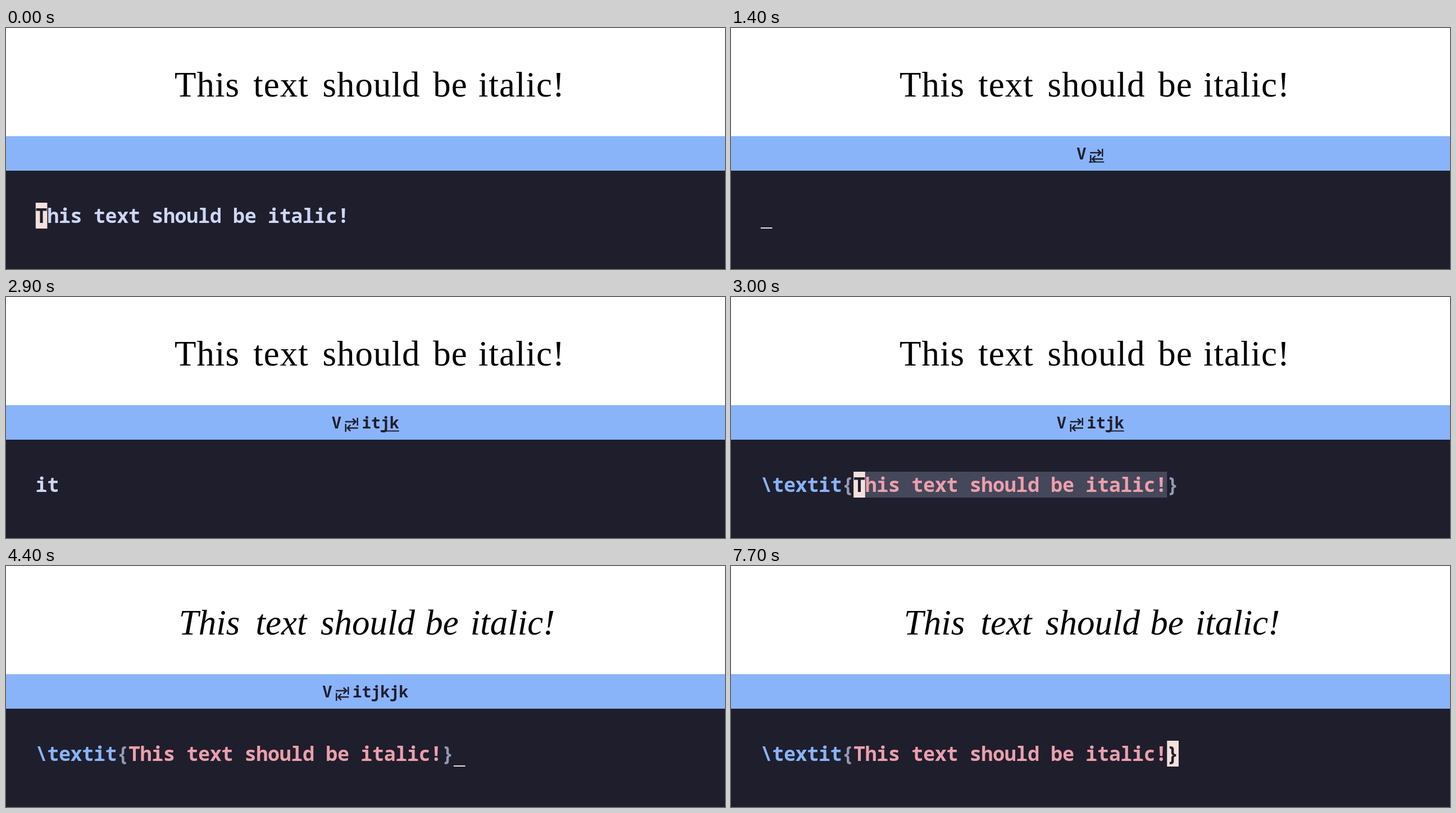
Recreate the animation shown at these times as an HTML page with a canvas. Size 1280 px wide and 429 px high, loop 8000 ms.

```html
<!DOCTYPE html>
<html lang="en">
<head>
<meta charset="utf-8">
<title>Italic snippet</title>
<style>
html, body { margin: 0; overflow: hidden; background: #1f1e2d; }
canvas { display: block; }
</style>
</head>
<body>
<canvas id="stage" width="1280" height="429"></canvas>
<script>
const ctx = document.getElementById('stage').getContext('2d');
const BASE = '#1f1e2d', BLUE = '#89b4fa', TEXT = '#cdd6f4', ROSE = '#f5e0dc',
      MAROON = '#eba0ac', GREY = '#9399b2', SELECT = '#45475a';
const MONO = '"Noto Sans Mono", "DejaVu Sans Mono", monospace';
const SERIF = '"Liberation Serif", "Noto Serif", serif';
const LOOP = 8000, PLAIN = 'This text should be italic!', WRAPPED = `\\textit{${PLAIN}}`;
const CELL = 20.67, LEFT = 52.8, KEY = 16.5;
const TAB = '\u21b9', ENTER = '\u23ce', TAB_WIDTH = 27, ENTER_WIDTH = 18, GAP = 5;

// [start ms, line, cursor column, cursor shape, first selected column, end of selection]
const editor = [
  [0, PLAIN, 0, 'block'],
  [500, PLAIN, 0, 'block', 1, 28],
  [1400, '', 0, 'line'],
  [2300, 'i', 1, 'line'],
  [2600, 'it', 2, 'line'],
  [2900, 'it'],
  [3000, WRAPPED, 8, 'block', 9, 35],
  [3800, WRAPPED, -1, '', 9, 35],
  [3900, WRAPPED, 36, 'line'],
  [4600, WRAPPED, 35, 'block'],
];

// [pressed at ms, keys]; the newest keys are underlined for 200 ms
const presses = [
  [500, 'V'], [1400, TAB], [2300, 'i'], [2600, 't'],
  [2900, 'jk'], [3800, 'jk'], [4600, ' Esc'], [5000, ' ' + ENTER],
];
const KEYS_END = 7700, PREVIEW_AT = 4400;

// Word centres in the preview
const roman = [358, 489.5, 650.5, 791, 918];
const italic = [362, 490, 644, 776, 902];

function rect(color, x, y, w, h) {
  ctx.fillStyle = color;
  ctx.fillRect(x, y, w, h);
}

function path(points, close) {
  points.forEach(([x, y], i) => i ? ctx.lineTo(x, y) : ctx.moveTo(x, y));
  if (close) ctx.closePath();
}

function drawPreview(t) {
  const slanted = t >= PREVIEW_AT;
  ctx.font = `${slanted ? 'italic ' : ''}63px ${SERIF}`;
  ctx.letterSpacing = slanted ? '0px' : '1px';
  ctx.textAlign = 'center';
  ctx.fillStyle = '#000';
  PLAIN.split(' ').forEach((word, i) => ctx.fillText(word, (slanted ? italic : roman)[i], 122));
  ctx.letterSpacing = '0px';
}

function drawTab(x) {
  ctx.lineWidth = 2.5;
  ctx.beginPath();
  path([[x + 1, 222], [x + 20, 222]]);
  path([[x + 14.5, 216.5], [x + 20, 222], [x + 14.5, 227.5]]);
  path([[x + 23, 215], [x + 23, 229]]);
  path([[x + 2, 226], [x + 2, 240]]);
  path([[x + 24, 233.2], [x + 5, 233.2]]);
  path([[x + 10.5, 227.7], [x + 5, 233.2], [x + 10.5, 238.7]]);
  ctx.stroke();
}

function drawEnter(x) {
  ctx.lineWidth = 1.5;
  ctx.beginPath();
  path([[1.5, 224.5], [8.5, 217.5], [8.5, 221.5], [12.5, 221.5], [12.5, 213.5],
        [17.5, 213.5], [17.5, 227.5], [8.5, 227.5], [8.5, 231.5]].map(([a, b]) => [x + a, b]), true);
  ctx.stroke();
}

function drawKeys(t) {
  if (t >= KEYS_END) return;
  const shown = presses.filter(([at]) => t >= at);
  const glyphs = [];
  let width = 0;
  shown.forEach(([at, keys]) => {
    for (const key of keys) {
      if (key === TAB) width += GAP;
      const w = key === TAB ? TAB_WIDTH : key === ENTER ? ENTER_WIDTH : KEY;
      glyphs.push({ key, x: width, w, fresh: t < at + 200 && key !== ' ' });
      width += w;
      if (key === TAB && shown.length > 2) width += GAP;
    }
  });
  const start = 640 - width / 2;
  ctx.font = `600 28px ${MONO}`;
  ctx.strokeStyle = BASE;
  for (const { key, x, w, fresh } of glyphs) {
    const left = start + x;
    ctx.fillStyle = BASE;
    if (key === TAB) drawTab(left + 1);
    else if (key === ENTER) drawEnter(left);
    else ctx.fillText(key, left + w / 2, 234);
    if (fresh) rect(BASE, left, 237.5, w, 2);
  }
}

function syntaxColor(line, i) {
  if (line !== WRAPPED) return TEXT;
  if (i < 7) return BLUE;
  return i === 7 || i === line.length - 1 ? GREY : MAROON;
}

function drawEditor(t) {
  const [, line, cursor, shape, from, to] = editor.findLast(([at]) => t >= at);
  const column = i => LEFT + i * CELL;
  if (to) rect(SELECT, column(from), 311, (to - from) * CELL, 46);
  if (shape === 'block') rect(ROSE, column(cursor), 311, CELL, 46);
  if (shape === 'line') rect(ROSE, column(cursor), 355, CELL, 2);
  ctx.font = `bold 35.2px ${MONO}`;
  [...line].forEach((char, i) => {
    ctx.fillStyle = shape === 'block' && i === cursor ? BASE : syntaxColor(line, i);
    ctx.fillText(char, column(i + 0.5), 347);
  });
}

function draw() {
  const t = performance.now() % LOOP;
  rect('#fff', 0, 0, 1280, 193);
  rect(BLUE, 0, 192.5, 1280, 61.5);
  rect(BASE, 0, 254, 1280, 175);
  drawPreview(t);
  drawKeys(t);
  drawEditor(t);
  requestAnimationFrame(draw);
}
draw();
</script>
</body>
</html>
```
